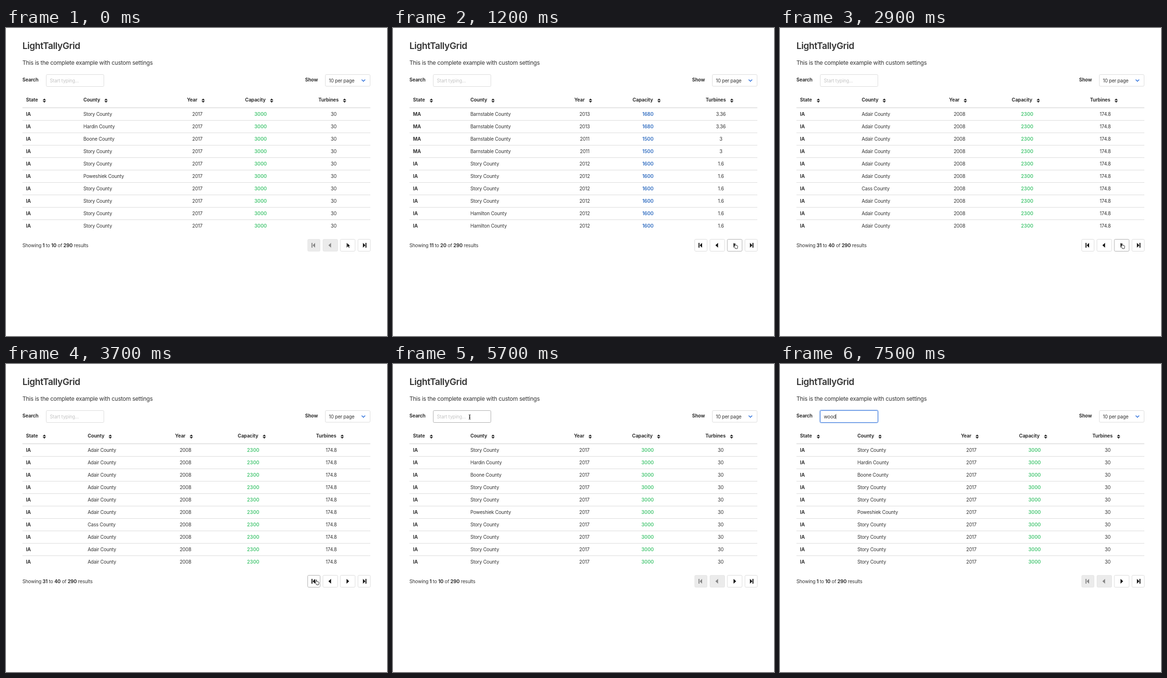
Write an HTML page that moves like this. It is 800 px wide and 645 px high and loops after 8000 ms.

```html
<!DOCTYPE html>
<html lang="en">
<head>
<meta charset="utf-8">
<title>Paged table</title>
<style>
  html, body { margin: 0; width: 100%; height: 100%; overflow: hidden; background: #fff; }
  svg { display: block; font: 10px Inter, sans-serif; letter-spacing: -.17px; fill: #333; }
  .title { font-size: 19px; font-weight: 600; letter-spacing: -.45px; }
  .subtitle { font-size: 12px; letter-spacing: -.25px; }
  .bold { font-weight: 700; letter-spacing: -.1px; }
  .cap { font-weight: 600; letter-spacing: 0; }
  .mid { text-anchor: middle; }
</style>
</head>
<body>
<svg id="stage" width="800" height="645" viewBox="0 0 800 645"></svg>
<script>
const LOOP = 8000, STEP = 100;
const GREEN = '#48c774', BLUE = '#2f6cc0', LINK = '#3273dc', BORDER = '#dbdbdb', HOVER = '#adadad';

// cols: x of county, then centres of year, capacity, turbines
// rows: state, county, year, capacity, turbines, repeat
const pages = [
  { cols: [162.5, 401.7, 534.5, 688], rows: [
    ['IA', 'Story', 2017, 3000, 30, 1], ['IA', 'Hardin', 2017, 3000, 30, 1],
    ['IA', 'Boone', 2017, 3000, 30, 1], ['IA', 'Story', 2017, 3000, 30, 2],
    ['IA', 'Poweshiek', 2017, 3000, 30, 1], ['IA', 'Story', 2017, 3000, 30, 4]] },
  { cols: [162.5, 402.4, 535.3, 688.5], rows: [
    ['MA', 'Barnstable', 2013, 1680, 3.36, 2], ['MA', 'Barnstable', 2011, 1500, 3, 2],
    ['IA', 'Story', 2012, 1600, 1.6, 4], ['IA', 'Hamilton', 2012, 1600, 1.6, 2]] },
  { cols: [170, 380, 521, 683.5], rows: [
    ['OH', 'Wood', 2004, 1800, 3.6, 2], ['IA', 'Adair', 2008, 2300, 174.8, 8]] },
  { cols: [171.4, 376.8, 519, 683], rows: [
    ['IA', 'Adair', 2008, 2300, 174.8, 6], ['IA', 'Cass', 2008, 2300, 174.8, 1],
    ['IA', 'Adair', 2008, 2300, 174.8, 3]] }
];

const buttons = [
  { x: 633.5, w: 26, icon: 'M641.5 450h2v10h-2zM649 450v10l-5-5z' },
  { x: 665.5, w: 31, icon: 'M682.5 450v10l-5.5-5z' },
  { x: 702, w: 31, icon: 'M715 450v10l5.5-5z' },
  { x: 739, w: 26, icon: 'M749.5 450v10l5-5zM754.8 450h2v10h-2z' }
];

const text = (x, y, s, cls = '', fill = '') =>
  `<text x="${x}" y="${y}" class="${cls}"${fill && ` fill="${fill}"`}>${s}</text>`;
const box = (x, y, w, h, stroke = BORDER, fill = '#fff') =>
  `<rect x="${x}" y="${y}" width="${w}" height="${h}" rx="2.2" fill="${fill}" stroke="${stroke}"/>`;
const rule = (y, color) => `<path d="M34.5 ${y}H765" stroke="${color}"/>`;
const sorter = x => `<path d="M${x - 3.5} 151.3l3.5-3.6 3.5 3.6zM${x - 3.5} 152.7l3.5 3.6 3.5-3.6z" fill="#222"/>`;

const smooth = u => u * u * (3 - 2 * u);
function glide(t, start, end, a, b) {
  const u = smooth(Math.min(1, Math.max(0, (t - start) / (end - start))));
  return a.map((v, i) => v + (b[i] - v) * u);
}

function pointer(t) {
  const next = [716.2, 450], first = [649.5, 450.5], field = [161, 111];
  return t < 4800 ? glide(t, 3100, 3700, next, first) : glide(t, 4800, 5700, first, field);
}

function drawTable({ cols: [county, year, cap, turb], rows }) {
  const heads = [['State', 42, 80.5], ['County', county, county + 47.5], ['Year', year - 21.7, year + 12.3],
    ['Capacity', cap - 32.4, cap + 23.3], ['Turbines', turb - 32, turb + 22.9]];
  let out = heads.map(([s, x, icon]) => text(x, 154, s, 'bold') + sorter(icon)).join('') + rule(167, '#cacaca');
  let i = 0;
  for (const [state, name, yr, kw, mw, repeat] of rows) {
    for (let n = 0; n < repeat; n++, i++) {
      const y = 184.4 + 26 * i;
      out += text(42, y, state, 'bold') + text(county, y, name + ' County') + text(year, y, yr, 'mid') +
        text(cap, y, kw, 'mid cap', kw > 2000 ? GREEN : BLUE) + text(turb, y, mw, 'mid');
      if (i < 9) out += rule(193.5 + 26 * i, BORDER);
    }
  }
  return out;
}

function drawSearch(t, hover) {
  const typed = 'wood'.slice(0, [6800, 7200, 7300, 7500].filter(at => t >= at).length);
  const focus = t >= 5800;
  let out = focus ? '<rect x="83.5" y="96.5" width="122.5" height="26.5" rx="3" fill="none" stroke="#3273dc" stroke-opacity=".28" stroke-width="2.4"/>' : '';
  out += box(84.5, 97.5, 121, 25, focus ? LINK : hover ? HOVER : BORDER);
  out += typed ? text(92, 113.5, typed) : text(92, 113.5, 'Start typing...', '', '#c4c4c4');
  if (focus && (t < 6300 || typed)) {
    const x = 92 + [0, 8, 13.8, 19.7, 25.7][typed.length];
    out += `<path d="M${x} 104.5v11" stroke="#333" stroke-width=".7"/>`;
  }
  return out;
}

function drawPointer(kind, [x, y]) {
  const arrow = '<path d="M0 0v9.6l2.2-2 1.5 3.4 1.8-.8-1.5-3.3h3z" fill="#000" stroke="#fff" stroke-width=".8"/>';
  const shapes = {
    arrow,
    blocked: arrow + '<g fill="#fff" stroke="#999" stroke-width="1.3"><circle cx="5.6" cy="15.3" r="4.6"/><path d="M2.4 12.1l6.4 6.4"/></g>',
    hand: '<path transform="translate(2 2.4)" d="M-.6 7L-2.8 4.6q-.6-1 .4-1.2l1.5 1V0q0-1 .9-1t.9 1v2.6q3.4.2 4.3 1.2.7.8.3 3l-.9 2.8H.6z" fill="#fff" stroke="#111" stroke-width=".9"/>',
    beam: '<path d="M-2-4.8q2 0 2 1.2v7.2q0 1.2-2 1.2M2-4.8q-2 0-2 1.2v7.2q0 1.2 2 1.2M-1.2 1h2.4" fill="none" stroke="#111" stroke-width=".9"/>'
  };
  return `<g transform="translate(${x} ${y})">${shapes[kind]}</g>`;
}

function scene(t) {
  const page = t >= 4000 ? 0 : [300, 1600, 2500].filter(at => t >= at).length;
  const pos = pointer(t), [px, py] = pos;
  const inField = px > 84 && px < 206 && py > 97 && py < 123;
  const over = t < 100 || py < 442 || py > 468 ? -1 : buttons.findIndex(b => px >= b.x && px <= b.x + b.w);
  const disabled = i => page === 0 && i < 2;
  const kind = inField ? 'beam' : over < 0 ? 'arrow' : disabled(over) ? 'blocked' : 'hand';
  const bold = s => `<tspan class="bold">${s}</tspan>`;

  return text(34.5, 43.5, 'LightTallyGrid', 'title') +
    text(34.5, 76.5, 'This is the complete example with custom settings', 'subtitle') +
    text(34.5, 112, 'Search', 'bold') + drawSearch(t, inField) +
    text(628, 112, 'Show', 'bold') + box(670.5, 97.5, 94, 24.5) + text(678, 113.5, '10 per page') +
    `<path d="M746.8 108l3.7 3.6 3.7-3.6" fill="none" stroke="${LINK}" stroke-width="1.6"/>` +
    drawTable(pages[page]) +
    text(34.5, 458.6, `Showing ${bold(page * 10 + 1)} to ${bold(page * 10 + 10)} of ${bold(290)} results`) +
    buttons.map(({ x, w, icon }, i) => {
      const off = disabled(i);
      return box(x, 442.5, w, 25, off ? '#e6e6e6' : i === over ? HOVER : BORDER, off ? '#ebebeb' : '#fff') +
        `<path d="${icon}" fill="${off ? '#858585' : '#111'}"/>`;
    }).join('') +
    (t < 6800 ? drawPointer(kind, pos) : '');
}

const stage = document.getElementById('stage');
const origin = performance.now();
let shown = -1;
function tick() {
  const t = Math.floor((performance.now() - origin) % LOOP / STEP) * STEP;
  if (t !== shown) stage.innerHTML = scene(shown = t);
  requestAnimationFrame(tick);
}
tick();
</script>
</body>
</html>
```
